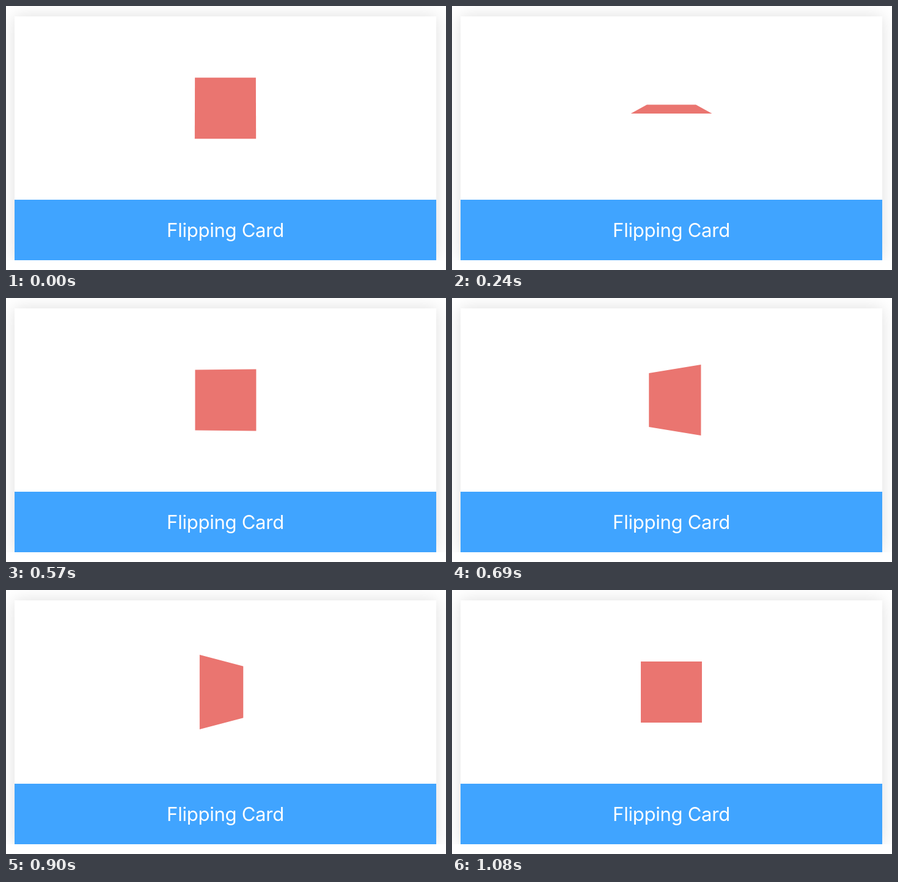
These frames come from a looping animation (720x432 px, 1.11 s). An HTML page:

```html
<!DOCTYPE html>
<html lang="en">
<head>
<meta charset="utf-8">
<title>Flipping Card</title>
<style>
  @property --t {
    syntax: "<number>";
    inherits: false;
    initial-value: 0;
  }

  html, body {
    margin: 0;
    width: 100%;
    height: 100%;
    overflow: hidden;
    background: #fff;
  }

  .stage {
    position: relative;
    width: 720px;
    height: 416px;
    overflow: hidden;
  }

  .card {
    position: absolute;
    left: 14px;
    top: 16.5px;
    width: 690px;
    height: 399.5px;
    background: #fff;
    box-shadow: 0 0 24px rgba(0, 0, 0, .13);
  }

  .label {
    position: absolute;
    left: 14px;
    top: 317px;
    width: 690px;
    height: 99px;
    background: #40a4ff;
    color: #fff;
    font: 400 31px/99px Inter, "Liberation Sans", sans-serif;
    letter-spacing: -.25px;
    text-align: center;
  }

  /* Half a turn about X, then half a turn about Y, each with sine easing. */
  .square {
    --phase: calc((var(--t) + 22) * 180deg / 555);
    --x: clamp(0deg, var(--phase), 180deg);
    --y: clamp(0deg, var(--phase) - 180deg, 180deg);
    position: absolute;
    left: 309.3px;
    top: 116.6px;
    width: 100px;
    height: 100px;
    background: #ea7570;
    transform: perspective(200px)
      rotateX(calc(90deg * (1 - cos(var(--x)))))
      rotateY(calc(90deg * (1 - cos(var(--y)))));
    animation: tick 1110ms steps(37) -5ms infinite;
  }

  @keyframes tick {
    from { --t: 0; }
    to { --t: 1110; }
  }
</style>
</head>
<body>
  <div class="stage">
    <div class="card"></div>
    <div class="square"></div>
    <div class="label">Flipping Card</div>
  </div>
</body>
</html>
```
